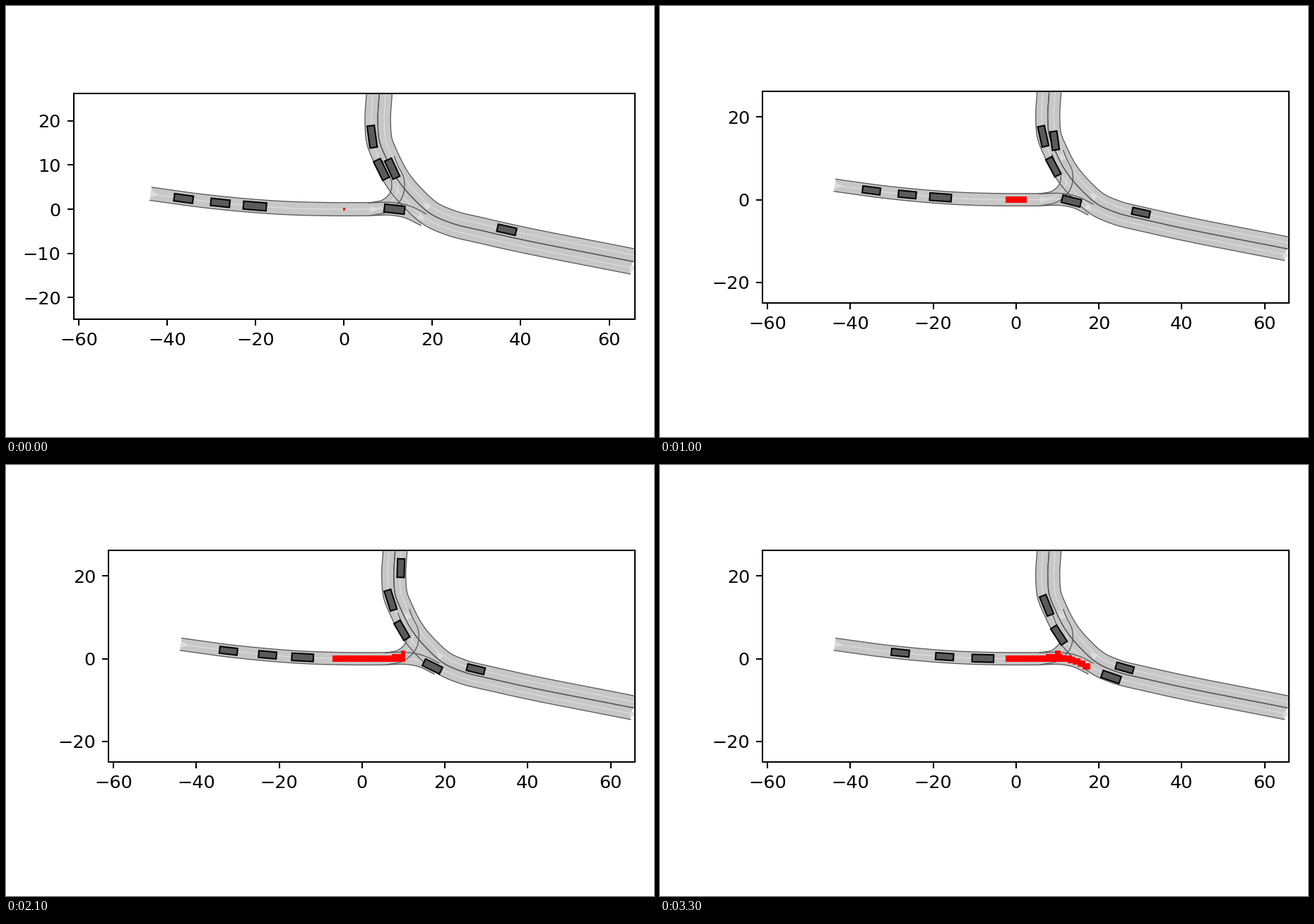
These frames come from a looping animation (917 by 611 pixels, 3400 ms). A matplotlib script:

```python
import numpy as np
import matplotlib.pyplot as plt
from matplotlib.animation import FuncAnimation
from matplotlib.collections import PolyCollection
from matplotlib.patches import Polygon

W, H, DPI = 917, 611, 183.4
FRAMES, STEP_MS = 34, 100
XLIM, YLIM = (-61.2, 65.83), (-25.0, 26.22)
LANE = 2.9

plt.rcParams["font.family"] = "DejaVu Sans"
fig = plt.figure(figsize=(5, 3.3316), dpi=DPI, facecolor="white")
ax = fig.add_axes([0.1, 0.3, 0.8, 0.5])
ax.set(xlim=XLIM, ylim=YLIM, xticks=range(-60, 61, 20))


def chord(line):
    """Running length along a line."""
    return np.r_[0, np.cumsum(np.hypot(*np.diff(line, axis=0).T))]


def smooth(points, n=400):
    """Cubic Hermite curve through a few key points."""
    p = np.array(points, float)
    t = chord(p)
    m = np.gradient(p, t, axis=0)
    u = np.linspace(0, t[-1], n)
    i = np.clip(np.searchsorted(t, u, side="right") - 1, 0, len(p) - 2)
    h = (t[i + 1] - t[i])[:, None]
    s = (u - t[i])[:, None] / h
    return ((1 + 2 * s) * (1 - s) ** 2 * p[i] + s * (1 - s) ** 2 * h * m[i]
            + s * s * (3 - 2 * s) * p[i + 1] + s * s * (s - 1) * h * m[i + 1])


def offset(line, d):
    """The line moved sideways, positive to its left."""
    dx, dy = np.gradient(line, axis=0).T
    return line + d * np.column_stack([-dy, dx]) / np.hypot(dx, dy)[:, None]


def rotate(pts, deg):
    c, s = np.cos(np.radians(deg)), np.sin(np.radians(deg))
    return np.asarray(pts) @ np.array([[c, s], [-s, c]])


west = smooth([(-43.7, 3.48), (-35, 2.25), (-24.6, 1.1), (-14.5, .33), (-3.4, 0), (5.9, 0)])
divider = smooth([(8, 26.4), (7.65, 19.6), (8.05, 15.3), (9.4, 11.9), (12.4, 6.3),
                  (15.6, 2.5), (20, -1.3), (24, -3.05), (31.6, -4.95), (66.5, -12.1)])
turn = smooth([(5.9, 0), (9.4, .8), (11.8, 3.2), (12.2, 6.4), (10.9, 9.2),
               (9.3, 14.3), (9.3, 19), (10, 34)])
east = smooth([(5.9, 0), (11, .05), (14, -.5), (18.15, -2.45), (22.85, -4.4), (32, -6.6)])
back = offset(divider, LANE / 2)[::-1]
south = offset(divider, -LANE / 2)


def draw_lane(line, width=LANE):
    sides = offset(line, width / 2), offset(line, -width / 2)
    ax.add_patch(Polygon(np.vstack([sides[0], sides[1][::-1]]), fc="#c7c7c7", ec="none", zorder=1))
    for side in sides:
        ax.plot(*side.T, color="#555555", lw=.5, zorder=3)
    ax.plot(*line.T, color="#dddddd", lw=.5, zorder=2)


def draw_arrow(x, y, deg):
    tri = rotate([(0, -.75), (1.9, 0), (0, .75)], deg) + (x, y)
    ax.add_patch(Polygon(tri, fc="#dddddd", ec="none", zorder=2))


class Car:
    """A box that drives along a line; travel gives its distance from the start."""

    def __init__(self, line, start, travel, size=(4.3, 1.65)):
        self.line, self.arc, self.travel = line, chord(line), travel
        self.start = self.arc[np.argmin(np.hypot(*(line - start).T))]
        self.box = np.array([(-1, -1), (1, -1), (1, 1), (-1, 1)]) * size / 2
        self.patch = ax.add_patch(Polygon(self.box, fc="#5b5b5b", ec="black", lw=.8, zorder=5))

    def point(self, s):
        return np.array([np.interp(s, self.arc, c) for c in self.line.T])

    def move(self, k):
        s = self.start + self.travel(k)
        dx, dy = self.point(s + 2) - self.point(s - 2)
        self.patch.set_xy(rotate(self.box, np.degrees(np.arctan2(dy, dx))) + self.point(s))


def speed_up(v, a=0):
    return lambda k: v * k + a * k * k


def brake(k):
    return 9.5 * (1 - np.exp(-k / 9)) + .05 * k


draw_lane(west, 3)
draw_lane(east[east[:, 0] < 18])
draw_lane(turn[turn[:, 1] < 11.5])
draw_lane(south[south[:, 0] < 65.2])
draw_lane(back)
for arrow in [(-43.6, 3.45, -8), (5.9, 0, 0), (16.9, -1.5, -38), (19.2, .3, 138),
              (11.3, 9.7, 116), (64.6, -13.3, -12)]:
    draw_arrow(*arrow)

cars = [
    Car(west, (-36.3, 2.45), speed_up(.09, .005)),
    Car(west, (-28, 1.5), speed_up(.109, .0066)),
    Car(west, (-20.1, .8), speed_up(.118, .0076), (5.2, 1.8)),
    Car(east, (11.4, 0), speed_up(.118, .0078), (4.6, 1.8)),
    Car(back, (36.8, -4.6), brake),
    Car(turn, (10.9, 9.2), speed_up(.459, .0076), (4.5, 1.7)),
    Car(south, (6.3, 16.4), speed_up(.112), (5.0, 1.65)),
    Car(offset(south, -.6), (8.3, 8.8), speed_up(.115), (4.7, 1.7)),
]
area = ax.add_collection(PolyCollection([], fc="red", ec="none", zorder=4), autolim=False)


def area_boxes(k):
    """Reachable area as x0, x1, y0, y1 boxes: a body, a hump and a tip along the lane."""
    r = .25 + .023 * k * k
    lo = max(-r, -7.3 + .024 * max(k - 19, 0) ** 2)
    hi = min(r, 13.4 + .51 * (k - 24))
    h = min(.25 + .09 * k, .75)
    boxes = [(lo, min(hi, 13.4), -h, h)]
    for x0, x1, top in [(7.2, 11.2, 1.2), (9.4, 10.8, 1.9)]:
        if hi > x0:
            boxes.append((x0, min(x1, hi), 0, top))
    for x in np.arange(hi - 1, 12.6, -1.2):
        y = np.interp(x, *east.T)
        boxes.append((x - 1, x + 1, y - .75, y + .75))
    return boxes


def layout(k):
    # The axes settle into their final place during the first steps.
    left, mid = (95.5, 284.2) if k == 0 else (144.9 - 11 * .4 ** (k - 1), 271)
    width = 890 - left
    height = width * (YLIM[1] - YLIM[0]) / (XLIM[1] - XLIM[0])
    ax.set_position([left / W, 1 - (mid + height / 2) / H, width / W, height / H])
    ax.set_yticks(range(-20, 21, 10 if k == 0 else 20))


def update(k):
    layout(k)
    for car in cars:
        car.move(k)
    area.set_verts([[(a, c), (b, c), (b, d), (a, d)] for a, b, c, d in area_boxes(k)])
    return []


anim = FuncAnimation(fig, update, frames=FRAMES, interval=STEP_MS, repeat=True,
                     repeat_delay=0, init_func=lambda: update(0), blit=False)
plt.show()
```
